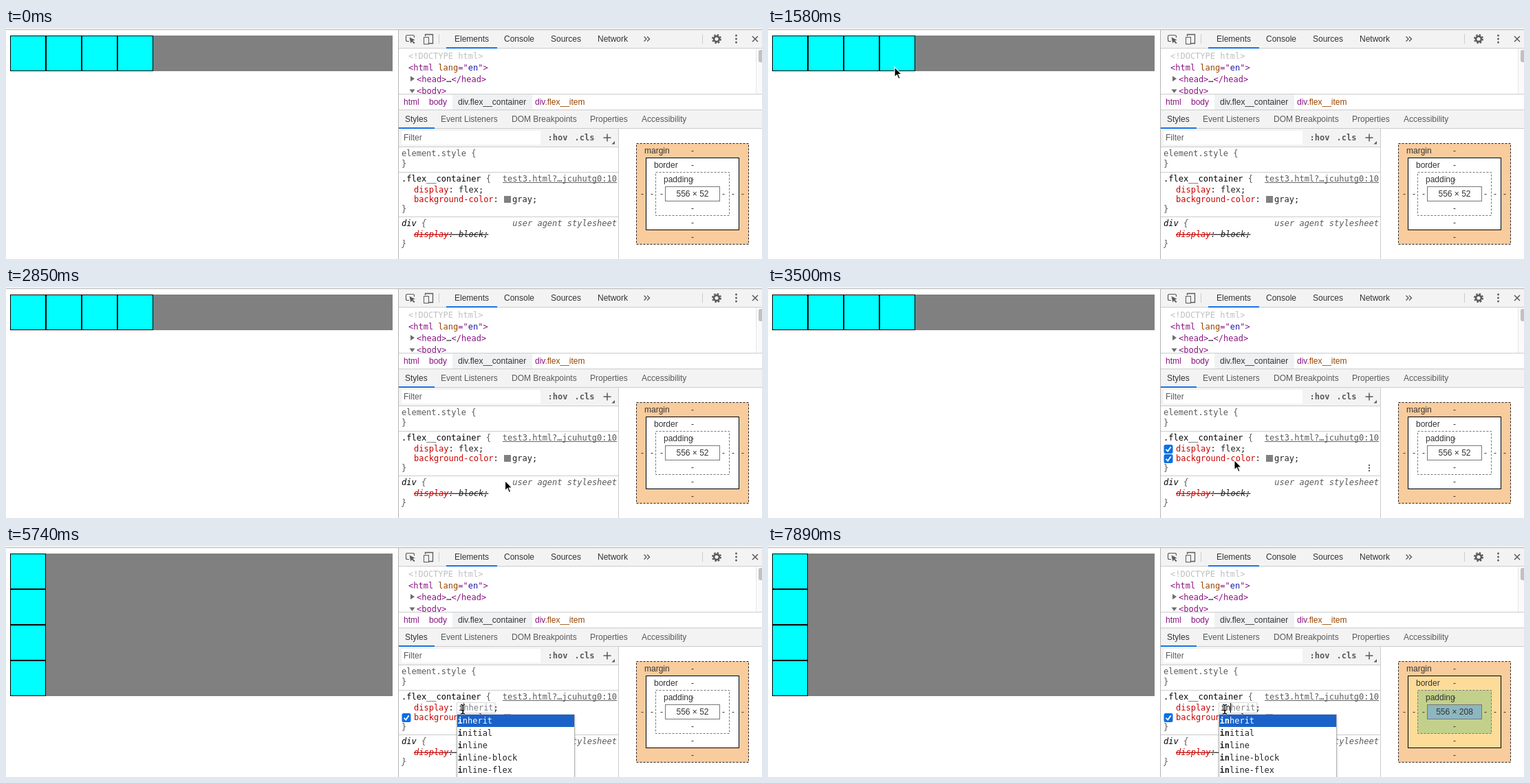
An HTML page for the animation above (8 s loop, 1099 by 337 pixels).

```html
<!DOCTYPE html>
<html lang="en">
<head>
<meta charset="utf-8">
<title>Flex container inspector</title>
<style>
  html, body { margin: 0; width: 100%; height: 100%; overflow: hidden; background: #fff; }
  svg { display: block; width: 1099px; height: 337px; }
  text { font: 12px "Liberation Sans", Arial, sans-serif; fill: #333; white-space: pre; }
  .mono { font-family: "DejaVu Sans Mono", monospace; fill: #222; }
  .b { font-weight: bold; }
  .i { font-style: italic; }
  .mid { text-anchor: middle; }
  .end { text-anchor: end; }
  .soft { fill: #5a5a5a; }
  .red { fill: #c80000; }
  .tag { fill: #881280; }
  .attr { fill: #994500; }
  .val { fill: #1a1aa6; }
  .black { fill: #000; }
  .strike { text-decoration: line-through; }
</style>
</head>
<body>
<svg id="stage" viewBox="0 0 1099 337"></svg>
<script>
const LOOP = 8000;
const HOVER = 3390, EDIT = 4370, TYPE = 5740, MEASURE = 5800, TYPE2 = 5860;
const BLINK = [6400, 6870, 7410, 7890];

// Each pointer move: [time, x, y] points, held after the last one
const MOVES = [
  [[590, 518, 308.5], [705, 470, 271], [820, 420, 232.5]],
  [[1120, 406.5, 217.5], [1290, 334, 152], [1460, 238, 82], [1640, 164, 47],
   [1740, 178, 36], [1920, 288, 38]],
  [[1980, 323, 40], [2094, 384.5, 44.5], [2270, 460, 53], [2440, 506, 59], [2730, 503, 62]],
  [[2790, 606, 160], [2847, 725.5, 282.5], [2970, 744, 317], [3150, 741, 316],
   [3380, 696, 276], [3531, 667, 237]],
  [[3610, 666, 240], [3780, 663, 239], [3960, 664, 238]]
];
const TICK = 57;

const rect = (x, y, w, h, fill, more = '') =>
  `<rect x="${x}" y="${y}" width="${w}" height="${h}" fill="${fill}" ${more}/>`;
const frame = (x, y, w, h, fill, stroke, more = '') =>
  rect(x + .5, y + .5, w - 1, h - 1, fill, `stroke="${stroke}" ${more}`);
const path = (d, stroke, width = 1, fill = 'none') =>
  `<path d="${d}" fill="${fill}" stroke="${stroke}" stroke-width="${width}"/>`;
const label = (x, y, s, cls = '') => `<text x="${x}" y="${y}" class="${cls}">${s}</text>`;
const code = (x, y, s, cls = '') => label(x, y, s, 'mono ' + cls);
const span = (cls, s) => `<tspan class="${cls}">${s}</tspan>`;
const group = (id, s) => `<g id="${id}">${s}</g>`;
const tag = s => span('tag', `&lt;${s}&gt;`);

function page() {
  const item = (x, y) => frame(x, y, 52, 52, '#0ff', '#000');
  const four = [0, 52, 104, 156];
  return rect(0, 0, 1099, 2, '#f1f1f1') + rect(0, 2, 1099, 1, '#b8b8b8') +
    group('row', rect(6, 11, 556, 52, '#808080') + four.map(d => item(6 + d, 11)).join('')) +
    group('column', rect(6, 11, 556, 208, '#808080') + four.map(d => item(6, 11 + d)).join(''));
}

function toolbar() {
  const ink = '#5a5a5a';
  const dots = [11, 16, 21].map(y => `<circle cx="1061.5" cy="${y}" r="1.4" fill="${ink}"/>`).join('');
  return rect(571, 3, 528, 27, '#f3f3f3') + rect(571, 29, 528, 1, '#ccc') +
    path('M586 19.5H583.5Q581.5 19.5 581.5 17.5V12.5Q581.5 10.5 583.5 10.5H591.5Q593.5 10.5 593.5 12.5V14', ink, 1.2) +
    path('M586.5 13.5L594.5 17.5L591.3 18.5L594.5 21.7L593 23L590 19.8L588.3 22.5Z', 'none', 0, ink) +
    path('M609.5 12V9.5H620.5V22.5H615', ink, 1.3) +
    frame(607, 13, 8, 11, '#f3f3f3', ink) +
    rect(629, 9, 1, 14, '#ccc') + rect(1012, 9, 1, 14, '#ccc') +
    rect(640, 28, 74, 2, '#1a73e8') +
    label(652, 20, 'Elements') +
    [[724, 'Console'], [792, 'Sources'], [860, 'Network']].map(a => label(a[0], 20, a[1])).join('') +
    path('M927.5 12.5L931 16L927.5 19.5M932 12.5L935.5 16L932 19.5', ink, 1.4) +
    `<circle cx="1033" cy="16" r="3.9" fill="none" stroke="${ink}" stroke-width="2.6"/>` +
    `<circle cx="1033" cy="16" r="6" fill="none" stroke="${ink}" stroke-width="2" stroke-dasharray="2.5 2.212"/>` +
    dots + path('M1085 12L1093 20M1093 12L1085 20', ink, 1.5);
}

function tree() {
  return rect(571, 30, 528, 66, '#fff') +
    code(585, 45, '&lt;!DOCTYPE html&gt;').replace('<text', '<text style="fill:#c0c0c0"') +
    code(585, 62, span('tag', '&lt;html ') + span('attr', 'lang') + span('tag', '="') +
      span('val', 'en') + span('tag', '"&gt;')) +
    path('M588 70V78L594 74Z', 'none', 0, '#6e6e6e') +
    code(597, 79, tag('head') + '…' + tag('/head')) +
    path('M586.5 89.5H594.5L590.5 95Z', 'none', 0, '#6e6e6e') +
    code(597, 96, tag('body')) +
    rect(1090, 30, 9, 66, '#fafafa') + rect(1090, 30, 1, 66, '#e6e6e6') +
    rect(1094, 32, 8, 18, '#c1c1c1', 'rx="3"');
}

function crumbs() {
  const tabs = [[580, 'Styles'], [632, 'Event Listeners'], [735, 'DOM Breakpoints'],
    [849, 'Properties'], [924, 'Accessibility']];
  return rect(571, 96, 528, 24, '#fff') + rect(571, 96, 528, 1, '#ccc') +
    rect(649, 97, 116, 22, '#eff1f3') +
    label(578, 112, 'html', 'tag') + label(615, 112, 'body', 'tag') +
    label(657, 112, 'div.flex__container') +
    label(769, 112, span('tag', 'div') + span('attr', '.flex__item')) +
    rect(571, 119, 528, 28, '#f3f3f3') + rect(571, 119, 528, 1, '#ccc') +
    rect(571, 146, 528, 1, '#ccc') + rect(571, 145, 52, 2, '#1a73e8') +
    tabs.map((a, i) => label(a[0], 137, a[1], i ? 'soft' : '')).join('');
}

function styles() {
  return rect(571, 147, 528, 190, '#fff') +
    rect(571, 147, 319, 26, '#f3f3f3') + rect(575, 150, 202, 20, '#fff') +
    label(578, 164, 'Filter', 'soft') +
    code(787.5, 164, ':hov', 'b soft') + code(826.5, 164, '.cls', 'b soft') +
    path('M868.5 160H879.5M874 154.5V165.5', '#5a5a5a', 1.5) +
    path('M885 165V169.5H880.5Z', 'none', 0, '#5a5a5a') +
    [173, 210, 275].map(y => rect(571, y, 319, 1, '#ccc')).join('') +
    code(575, 187, 'element.style {', 'soft') + code(575, 202, '}', 'soft') +
    code(575, 224, span('black', '.flex__container') + span('soft', ' {')) +
    code(888, 224, 'test3.html?…jcuhutg0:10', 'soft end') + rect(722, 225, 166, 1, '#666') +
    code(593, 240, span('red', 'display') + ':') +
    code(593, 254, span('red', 'background-color') + ':') +
    rect(724, 245, 10, 10, '#808080') + code(736, 254, 'gray;') +
    code(575, 268, '}', 'soft') +
    code(575, 289, span('black', 'div') + span('soft', ' {'), 'i') +
    code(888, 289, 'user agent stylesheet', 'i soft end') +
    code(593, 305, '<tspan class="red strike">display</tspan><tspan class="strike">: block;</tspan>', 'i') +
    code(575, 319, '}', 'i soft') +
    rect(890, 147, 1, 190, '#ccc');
}

function boxModel() {
  const dash = 'stroke-dasharray="3 2"';
  const layers = (a, b, c) => frame(930, 189, 136, 106, a, '#000') +
    frame(944, 210, 108, 64, b, '#777', dash) + frame(958, 231, 80, 22, c, '#777');
  const marks = [[998, 183], [998, 204], [998, 225], [998, 267], [998, 288], [998, 309],
    [925, 246], [939, 246], [953, 246], [1043, 246], [1057, 246], [1071, 246]];
  return frame(916, 168, 164, 148, '#f9cc9d', '#222', dash) +
    group('plain', layers('#fff', '#fff', '#fff') + label(998, 246, '556 × 52', 'mid')) +
    group('tinted', layers('#fddc9a', '#c3d08b', '#8cb6c0') + label(998, 246, '556 × 208', 'mid')) +
    label(928, 183, 'margin') + label(942, 204, 'border') + label(956, 225, 'padding') +
    marks.map(m => label(m[0], m[1], '-', 'mid')).join('');
}

function editor() {
  const check = y => rect(575.5, y, 13, 13, '#0b70e3', 'rx="2.5"') +
    path(`M578.5 ${y + 6.8}L581.2 ${y + 9.6}L585.7 ${y + 3.2}`, '#fff', 1.8);
  const field = w => rect(654.5, 228.5, w + 2, 17, '#000', 'opacity=".07" rx="1"') +
    frame(655, 228, w, 16, '#fff', '#ddd');
  const typed = n => code(658, 240, span('black', 'inherit'.slice(0, n)) +
    `<tspan style="fill:#808080">${'inherit'.slice(n)}</tspan>;`);
  const words = ['inherit', 'initial', 'inline', 'inline-block', 'inline-flex'];
  const list = n => words.map((w, i) =>
    `<text x="656.5" y="${259 + i * 18}" class="mono" ${i ? '' : 'style="fill:#fff"'}>` +
    `${span('b', w.slice(0, n)).replace('class', i ? 'class' : 'style="fill:#fff" class')}${w.slice(n)}</text>`).join('');
  return group('toggle', check(230) +
      [259, 263, 267].map(y => rect(873, y, 2, 2, '#5a5a5a')).join('')) +
    group('toggle2', check(244)) +
    group('value', code(658, 240, 'flex;')) +
    group('edit', field(34) + rect(657, 229, 30, 14, '#b4d5f5') + code(658, 240, 'flex;')) +
    group('typing', field(56) + group('one', typed(1)) + group('two', typed(2)) +
      rect(653, 247, 176, 95, '#000', 'opacity=".06"') +
      frame(655, 245.5, 172, 100, '#fff', '#b0b0b0') + rect(656, 246, 170, 18, '#1a62c9') +
      group('listOne', list(1)) + group('listTwo', list(2))) +
    group('caret', rect(0, 229, 1, 14, '#000'));
}

function pointers() {
  const beam = 'M-3 -6.5Q0 -6.5 0 -4.5V5Q0 7 -3 7M3 -6.5Q0 -6.5 0 -4.5M0 5Q0 7 3 7M-1.8 2H1.8';
  return group('arrow',
      path('M0 0V14.6L3.4 11.4L5.8 17.2L8.2 16.2L5.8 10.6H10.4Z', '#fff', 1.2, '#000')) +
    group('beam', path(beam, '#fff', 3) + path(beam, '#000', 1.3));
}

const stage = document.getElementById('stage');
stage.innerHTML = page() + rect(570, 3, 1, 334, '#b5b5b5') + toolbar() + tree() + crumbs() +
  styles() + boxModel() + editor() + pointers();

const parts = {};
stage.querySelectorAll('g').forEach(g => parts[g.id] = g);
const show = (id, on) => parts[id].style.display = on ? '' : 'none';
const move = (id, x, y) => parts[id].setAttribute('transform', `translate(${x} ${y})`);

// Smooth curve through timed points
function along(keys, t) {
  const last = keys.length - 1;
  if (t >= keys[last][0]) return keys[last].slice(1);
  let i = 0;
  while (t >= keys[i + 1][0]) i++;
  const a = keys[i], b = keys[i + 1], span = b[0] - a[0], u = (t - a[0]) / span;
  const slope = (k, c) => {
    const p = keys[Math.max(k - 1, 0)], n = keys[Math.min(k + 1, last)];
    return (n[c] - p[c]) / (n[0] - p[0]) * span;
  };
  return [1, 2].map(c => {
    const d = b[c] - a[c], m = slope(i, c), n = slope(i + 1, c);
    return a[c] + u * (m + u * (3 * d - 2 * m - n + u * (m + n - 2 * d)));
  });
}

function pointerAt(t) {
  const keys = MOVES.filter(k => k[0][0] <= t).pop();
  if (!keys) return null;
  const start = keys[0][0];
  return along(keys, start + Math.floor((t - start) / TICK) * TICK);
}

function draw(t) {
  const block = t >= TYPE, second = t >= TYPE2, editing = t >= EDIT;
  show('row', !block);
  show('column', block);
  show('plain', t < MEASURE);
  show('tinted', t >= MEASURE);
  show('toggle', t >= HOVER && !editing);
  show('toggle2', t >= HOVER);
  show('value', !editing);
  show('edit', editing && !block);
  show('typing', block);
  for (const id of ['one', 'listOne']) show(id, !second);
  for (const id of ['two', 'listTwo']) show(id, second);
  show('caret', block && BLINK.filter(b => t >= b).length % 2 === 0);
  move('caret', second ? 672 : 665, 0);

  const p = pointerAt(t), text = t >= 3610;
  show('arrow', p && !text);
  show('beam', p && text);
  if (p) move(text ? 'beam' : 'arrow', p[0], p[1]);
}

const begin = performance.now();
function tick() {
  draw((performance.now() - begin) % LOOP);
  requestAnimationFrame(tick);
}
tick();
</script>
</body>
</html>
```
